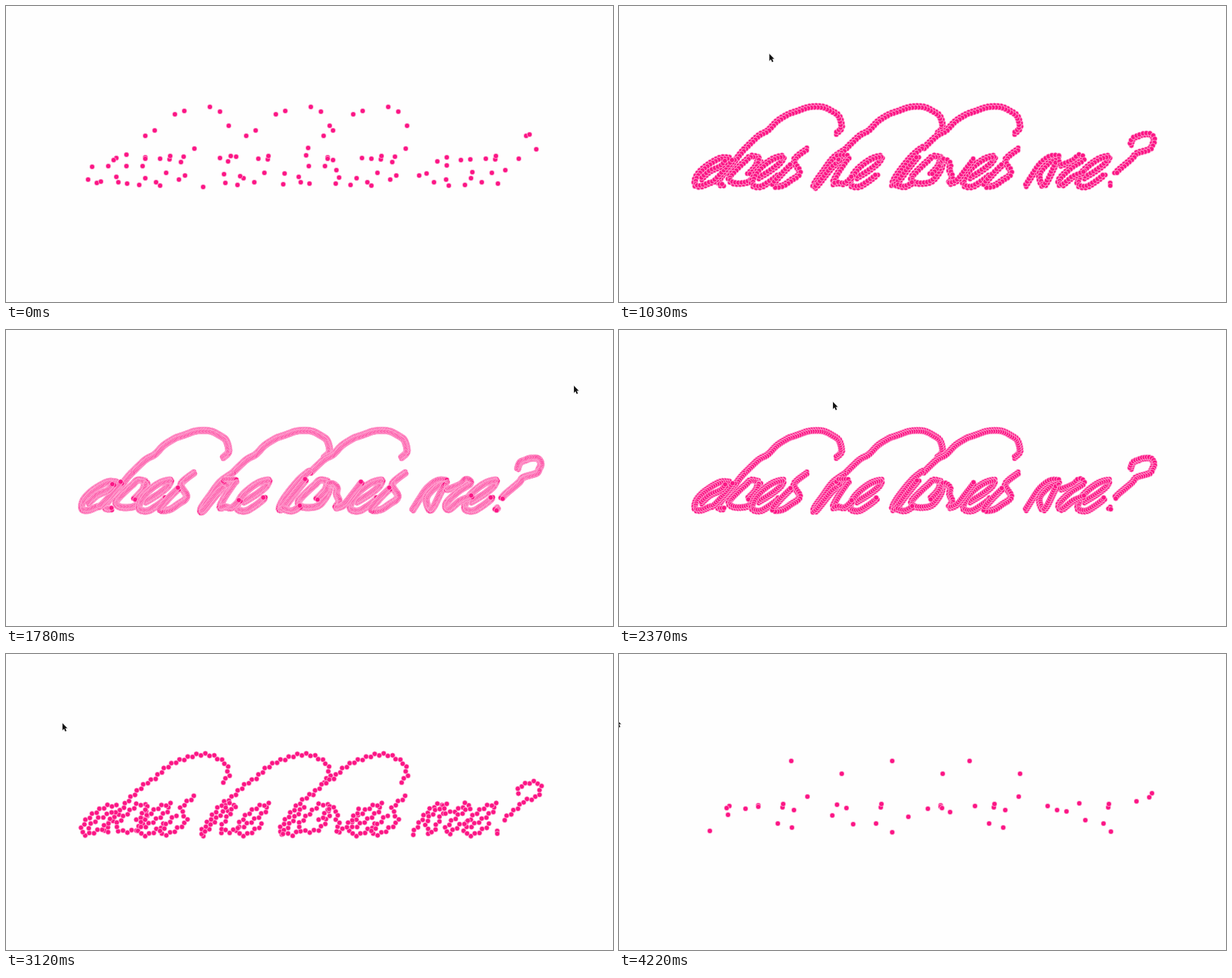
Write an HTML page with a canvas that moves like this. It is 902 px wide and 440 px high and loops after 4.32 s.

```html
<!DOCTYPE html>
<html lang="en">
<head>
<meta charset="utf-8">
<title>does he loves me?</title>
<style>
html, body { margin: 0; width: 100%; height: 100%; overflow: hidden; background: #fefefe; }
canvas { display: block; }
</style>
</head>
<body>
<canvas id="stage" width="902" height="440"></canvas>
<script>
const ctx = document.getElementById('stage').getContext('2d');
const LOOP = 4320;

// Moments at which the picture is redrawn
const ticks = [0, 130, 230, 330, 430, 530, 630, 730, 830, 930, 1060, 1160,
  1260, 1340, 1470, 1540, 1690, 1780, 1990, 2070, 2150, 2220, 2300, 2370, 2450,
  2530, 2630, 2730, 2830, 2920, 3020, 3120, 3220, 3320, 3420, 3520, 3620,
  3720, 3820, 3920, 4020, 4120, 4220];

// Pointer path: time, x, y
const pointerPath = [
  [730, 70, 67], [1160, 400, 76], [1340, 530, 82], [1540, 690, 79],
  [1690, 790, 81], [1780, 844, 83], [1990, 856, 81], [2370, 318, 107],
  [2530, 215, 108], [3020, 84, 104], [3120, 84, 103], [3620, 4, 98], [4220, -4, 97]
];

// Strokes run through knots "x,y". A suffix marks knots that stay as dots when
// the density is low: a = low, c = lowest, b = both.
const strokes = [];

function parse(text, dx) {
  return text.split(' ').map(word => {
    const [, x, y, mark] = word.match(/(\d+),(\d+)(\w?)/);
    return { x: +x + dx, y: +y, mark };
  });
}

function spline(a, b, c, d, t) {
  return .5 * (2 * b + (c - a) * t + (2 * a - 5 * b + 4 * c - d) * t * t
    + (3 * b - a - 3 * c + d) * t * t * t);
}

function draw(text, ...shifts) {
  for (const dx of shifts.length ? shifts : [0]) {
    const knots = parse(text, dx);
    const at = i => knots[Math.max(0, Math.min(knots.length - 1, i))];
    const line = [{ x: knots[0].x, y: knots[0].y, s: 0 }];
    for (let i = 0; i < knots.length - 1; i++) {
      const near = [at(i - 1), at(i), at(i + 1), at(i + 2)];
      for (let k = 1; k <= 10; k++) {
        const x = spline(...near.map(p => p.x), k / 10);
        const y = spline(...near.map(p => p.y), k / 10);
        const last = line[line.length - 1];
        line.push({ x, y, s: last.s + Math.hypot(x - last.x, y - last.y) });
      }
    }
    strokes.push({ knots, line, length: line[line.length - 1].s });
  }
}

const swash = '322,190 329,184 331,178b 327,164 318,157a 303,150a 283,150 265,156a 256,159c 251,161a 235,171 221,185a 207,193a 186,213';
const e = '207,256a 225,245 239,234 243,228b 244,223b 229,227a 212,239 201,252 198,266a 210,269 223,262a 236,252c 238,248a';
const o = '207,225b 196,223 188,230c 179,238a 164,254a 167,262a 180,264a 195,260 207,244 210,231 207,227b 203,238a 190,252';
const s = '280,212b 264,224a 260,232b 268,245 266,252a 257,258b 243,267 229,267a 240,252 257,235';

// does
draw(swash, 0, 150, 265);
draw('186,213 179,221a 165,240 152,254 148,265 158,266');
draw('164,226b 150,226 128,239a 115,253 113,266 122,268 135,263b 141,261a 152,250 162,239c 172,226');
draw('122,258a 135,246 152,238a 160,229b');
draw(o, 0, 271);
draw(e, 0, 146, 314, 484);
draw(s, 0, 314);

// he
draw('336,213 318,226a 303,246 290,265 293,269a 317,240c 330,231a 324,224c 334,223a 342,224a 338,229c 324,250a 318,264 326,263a 336,264 348,253b');

// loves
draw('451,210 449,211a 434,224 414,249a 406,265c 412,265a 430,242c 446,222a');
draw('412,266 425,269 438,262');
draw('480,229c 486,229a 492,235c 491,244a 495,255a 490,264a 502,260 516,243 529,226b');

// me?
draw('604,268 614,252a 625,236 637,226c 646,223 655,225a 641,231a 625,249a 629,267 636,262a 651,232c 655,237a 665,234c 676,229a 684,222c 690,228a 672,240 654,258a 658,267a 675,254 693,247b');
draw('760,207 764,197 773,193a 778,191a 790,191 795,199 792,207c 788,213b 769,219c 762,227a 742,244a 736,251');
draw('731,264b 727,268');

const total = strokes.reduce((sum, stroke) => sum + stroke.length, 0);

function random(n) {
  const v = Math.sin(n * 127.1 + 3.7) * 43758.5453;
  return v - Math.floor(v);
}

function dot(x, y) {
  ctx.beginPath();
  ctx.arc(x, y, 3.7, 0, 7);
  ctx.fill();
  ctx.stroke();
}

// Few dots: only the marked knots, each wavering slightly
function drawSparse(marks, step) {
  const still = step === 0 || step === ticks.length - 1;
  const sway = still ? 0 : 4.4;
  let id = 0;
  for (const { knots } of strokes) {
    for (const p of knots) {
      id++;
      if (!p.mark || !marks.includes(p.mark)) continue;
      dot(p.x + sway * (random(id + step * 311) - .5),
        p.y + sway * .7 * (random(id + step * 173 + 59) - .5));
    }
  }
}

// Many dots: evenly spaced along one side of each stroke and back on the other
function drawDense(count) {
  for (const { line, length } of strokes) {
    const n = Math.max(2, Math.round(count * length / total));
    const put = (from, side) => {
      let k = 1;
      for (let i = from; i < n; i += 2) {
        const d = i / n * length;
        while (k < line.length - 1 && line[k].s < d) k++;
        const a = line[k - 1], b = line[k], gap = b.s - a.s || 1;
        const f = (d - a.s) / gap;
        const nx = (a.y - b.y) / gap, ny = (b.x - a.x) / gap;
        dot(a.x + (b.x - a.x) * f + nx * side, a.y + (b.y - a.y) * f + ny * side);
      }
    };
    put(0, 1.5);
    put(1, -1.5);
  }
}

function pointerAt(t) {
  const i = pointerPath.findIndex(p => p[0] >= t);
  if (i < 1) return pointerPath[0].slice(1);
  const a = pointerPath[i - 1], b = pointerPath[i];
  const f = (t - a[0]) / (b[0] - a[0]);
  return [a[1] + (b[1] - a[1]) * f, a[2] + (b[2] - a[2]) * f];
}

const arrow = new Path2D('M0 0V10.2L2.3 8L4 12L5.8 11.2L4.1 7.3H7Z');

function drawPointer(x, y) {
  ctx.save();
  ctx.translate(x, y);
  ctx.lineWidth = 1.2;
  ctx.strokeStyle = '#ddd';
  ctx.stroke(arrow);
  ctx.fillStyle = '#111';
  ctx.fill(arrow);
  ctx.restore();
}

function render(step) {
  const t = ticks[step];
  const inside = t >= 730;
  const [x, y] = inside ? pointerAt(t) : [19, 0];
  const count = x * 5.7;

  ctx.fillStyle = '#fefefe';
  ctx.fillRect(0, 0, 902, 440);
  ctx.fillStyle = '#fb1685';
  ctx.strokeStyle = 'rgba(255,195,225,.85)';
  ctx.lineWidth = .9;

  if (count < 60) drawSparse('bc', step);
  else if (count < 150) drawSparse('ab', step);
  else drawDense(count);
  if (inside) drawPointer(x, y);
}

const start = performance.now();
let shown = -1;

function frame() {
  const t = (performance.now() - start) % LOOP;
  let step = ticks.length - 1;
  while (ticks[step] > t) step--;
  if (step !== shown) render(shown = step);
  requestAnimationFrame(frame);
}
frame();
</script>
</body>
</html>
```
